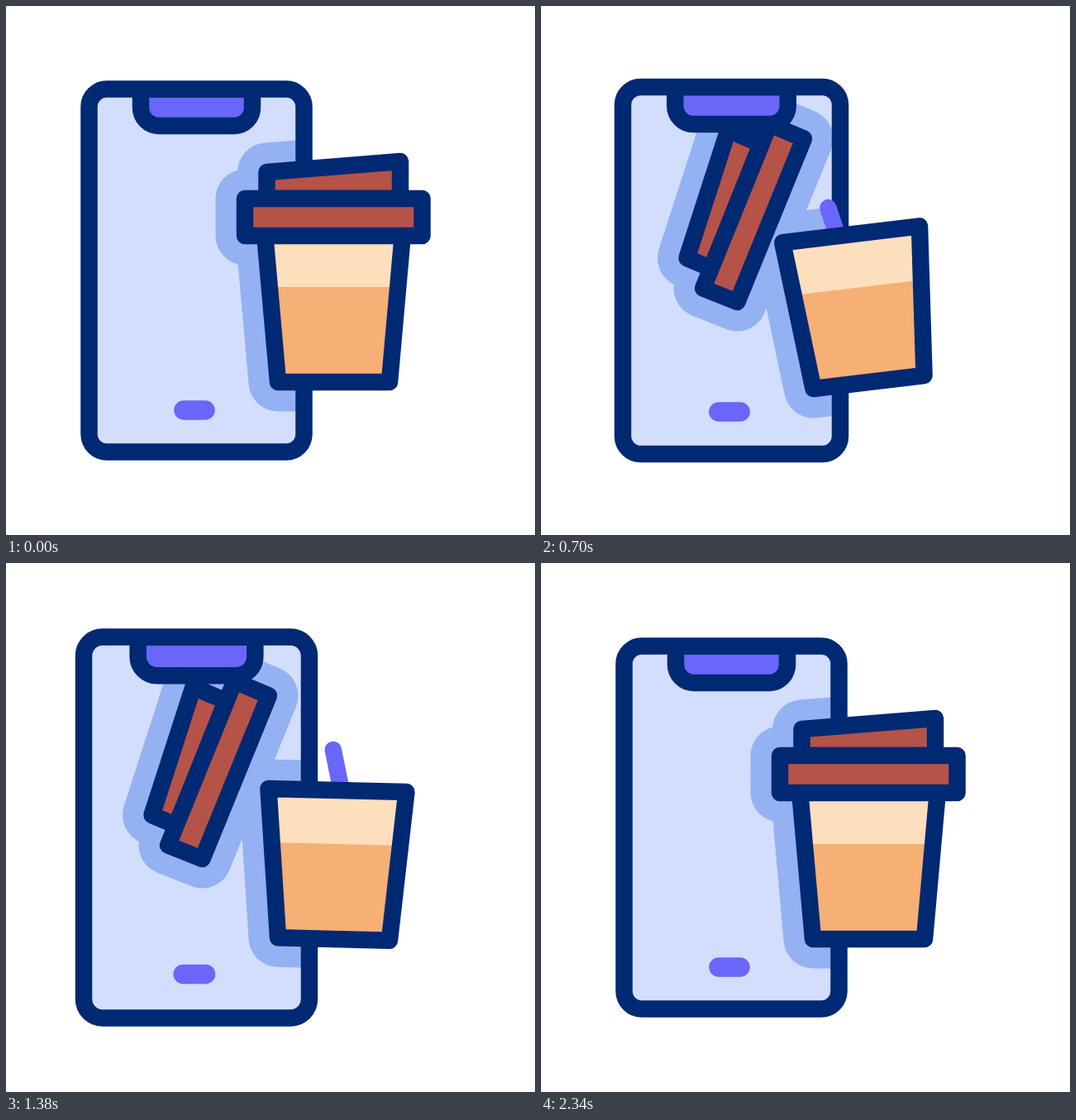
Write an HTML page with a canvas that moves like this. It is 640x640 px and loops after 2600 ms.

```html
<!DOCTYPE html>
<html lang="en">
<head>
<meta charset="utf-8">
<title>Coffee order</title>
<style>
  html, body { margin: 0; height: 100%; overflow: hidden; background: #fff; }
  canvas { display: block; width: 100vmin; height: 100vmin; }
</style>
</head>
<body>
<canvas id="stage" width="640" height="640"></canvas>
<script>
const ctx = document.getElementById('stage').getContext('2d');
const LOOP = 2600, LINE = 20.5, SHADOW = 71;
const NAVY = '#002973', SCREEN = '#d3ddfd', SHADE = '#94b1f3', PURPLE = '#6a66fa';
const CREAM = '#fddfbd', COFFEE = '#f6af75', BROWN = '#b55348';

const poly = d => new Path2D(`M${d}Z`);
const cup = poly('313,275 480,275 464,455 329,455');
const coffee = poly('318.8,340 474.2,340 464,455 329,455');
const lidTop = poly('315.5,201 477,188 477,233 315.5,233');
const lidRim = poly('289,233 503.5,233 503.5,278 289,278');
const backStick = poly('226.5,150 266,167 206,317.5 176.5,305');
const frontStick = poly('276.5,143 318,160.5 237.5,358 196,341.5');

const clamp = u => Math.min(Math.max(u, 0), 1);
const radians = degrees => degrees * Math.PI / 180;

function ramp(t, start, end) {
  const u = clamp((t - start) / (end - start));
  return u * u * (3 - 2 * u);
}

// Eases through the stops, spending the same time between each pair.
function swing(t, start, step, ...stops) {
  return stops.reduce((value, stop, i) => {
    const begin = start + (i - 1) * step;
    return value + (stop - stops[i - 1]) * ramp(t, begin, begin + step);
  });
}

const phoneScale = t => swing(t, 170, 240, 1, .9, 1, 1.1, .95, 1.05, 1);
const cupTilt = t => swing(t, 400, 380, 0, -7.7, 7.5, -2.3, 2.25, 0);
const lidScale = t => 1 - ramp(t, 40, 320) + ramp(t, 2080, 2320);
const stickScale = t => ramp(t, 170, 350) - ramp(t, 1900, 2120);
const stickTilt = t => 60 * clamp(Math.max(521 - t, t - 1778) / 355) ** 2;
const straw = t => ({
  x: swing(t, 70, 330, 400, 458, 371, 447, 390, 421, 400),
  y: swing(t, 70, 330, 300, 231, 240, 230, 226, 228, 260, 300),
  tilt: swing(t, 70, 330, 0, 18, -12, 22, -13, 14, 0)
});

function placed(x, y, degrees, scale, draw) {
  if (scale < .001) return;
  ctx.save();
  ctx.translate(x, y);
  ctx.rotate(radians(degrees));
  ctx.scale(scale, scale);
  ctx.translate(-x, -y);
  draw();
  ctx.restore();
}

function fill(path, color) {
  ctx.fillStyle = color;
  ctx.fill(path);
}

function stroke(path, color = NAVY, width = LINE) {
  ctx.strokeStyle = color;
  ctx.lineWidth = width;
  ctx.stroke(path);
}

function outlined(path, color) {
  fill(path, color);
  stroke(path);
}

function shadow(...paths) {
  for (const p of paths) {
    fill(p, SHADE);
    stroke(p, SHADE, SHADOW);
  }
}

function line(x1, y1, x2, y2, width) {
  const p = new Path2D();
  p.moveTo(x1, y1);
  p.lineTo(x2, y2);
  stroke(p, PURPLE, width);
}

function render(t) {
  // The phone changes size but keeps its line weight.
  const s = phoneScale(t);
  const px = x => 230.5 + (x - 230.5) * s, py = y => 320 + (y - 320) * s;
  const box = (x, y, w, h, radii) => {
    const p = new Path2D();
    p.roundRect(px(x), py(y), w * s, h * s, radii.map(r => r * s));
    return p;
  };
  const withCup = draw => placed(396.5, 455, cupTilt(t), 1, draw);
  const withLid = draw => withCup(() => placed(396, 256, 0, lidScale(t), draw));
  const withSticks = draw => placed(328, 352, stickTilt(t), stickScale(t), draw);

  ctx.fillStyle = '#fff';
  ctx.fillRect(0, 0, 640, 640);
  ctx.lineJoin = ctx.lineCap = 'round';

  const body = box(100.5, 100.5, 260, 439, [21.5]);
  fill(body, SCREEN);
  ctx.save();
  ctx.clip(body);
  withSticks(() => shadow(backStick, frontStick));
  withCup(() => shadow(cup));
  withLid(() => shadow(lidTop, lidRim));
  outlined(box(163, 100.5, 135, 44.5, [0, 0, 22, 22]), PURPLE);
  ctx.restore();
  stroke(body);
  line(px(215), py(489), px(241), py(489), 23.5);

  withSticks(() => {
    outlined(backStick, BROWN);
    outlined(frontStick, BROWN);
  });

  withCup(() => {
    const { x, y, tilt } = straw(t), a = radians(tilt);
    line(x, y, x - 90 * Math.sin(a), y + 90 * Math.cos(a), LINE);
    fill(cup, CREAM);
    fill(coffee, COFFEE);
    stroke(cup);
  });

  withLid(() => {
    outlined(lidTop, BROWN);
    outlined(lidRim, BROWN);
  });
}

function tick() {
  render(performance.now() % LOOP);
  requestAnimationFrame(tick);
}
tick();
</script>
</body>
</html>
```
